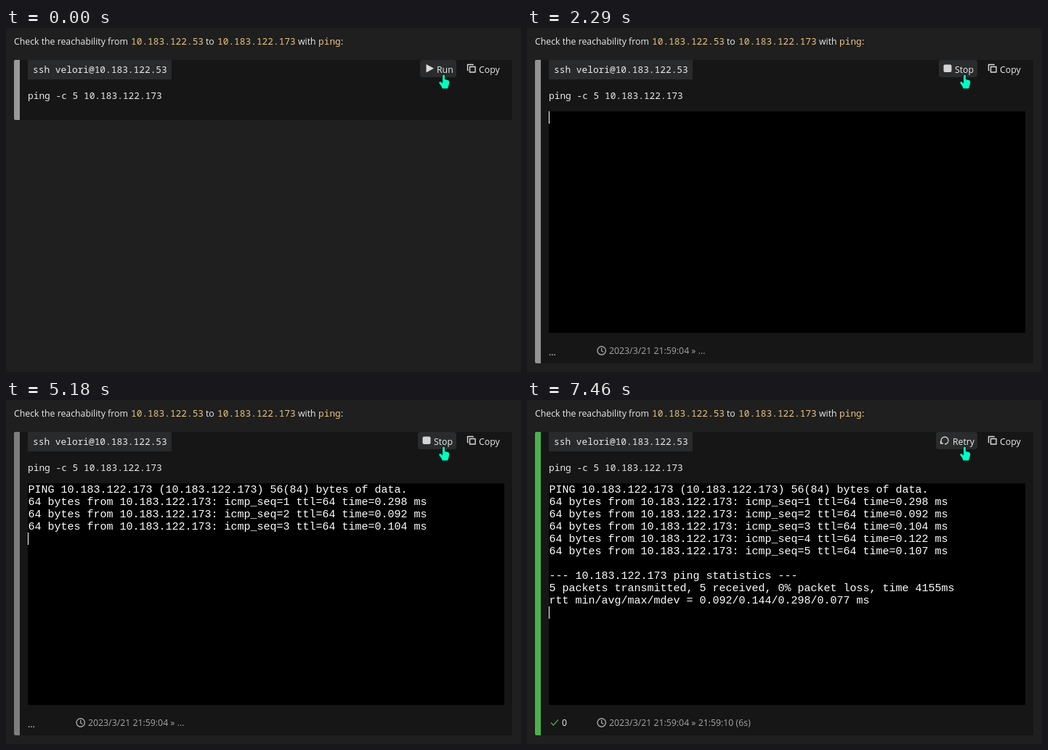
Write an HTML page with a canvas that moves like this. It is 709 by 475 pixels and loops after 8 s.

```html
<!DOCTYPE html>
<html lang="en">
<head>
<meta charset="utf-8">
<title>Ping check</title>
<style>
  html, body { margin: 0; width: 100%; height: 100%; overflow: hidden; background: #1e1f1e; }
  canvas { display: block; width: 709px; height: 475px; }
</style>
</head>
<body>
<canvas id="stage" width="709" height="475"></canvas>
<script>
const ctx = document.getElementById('stage').getContext('2d');

const LOOP = 8000;
const START = 500;
const DONE = 7460;
const PULSE = { period: 1030, peak: 3300, low: 70, high: 147 };

const UI = '12.3px "Open Sans", "Noto Sans", sans-serif';
const CODE = '12.83px "Noto Sans Mono", "DejaVu Sans Mono", monospace';
const TERM = '15px "Liberation Mono", monospace';
const LIGHT = '#ececec', AMBER = '#eac382', GRAY = '#a6a6a6', GREEN = '#4caf50';

const SRC = '10.183.122.53';
const DST = '10.183.122.173';

const reply = (seq, ms) => `64 bytes from ${DST}: icmp_seq=${seq} ttl=64 time=${ms} ms`;

// Terminal output: [time, line]
const output = [
  [2970, `PING ${DST} (${DST}) 56(84) bytes of data.`],
  [3110, reply(1, '0.298')],
  [4140, reply(2, '0.092')],
  [5180, reply(3, '0.104')],
  [6210, reply(4, '0.122')],
  [7240, reply(5, '0.107')],
  [7240, ''],
  [7240, `--- ${DST} ping statistics ---`],
  [7240, '5 packets transmitted, 5 received, 0% packet loss, time 4155ms'],
  [7240, 'rtt min/avg/max/mdev = 0.092/0.144/0.298/0.077 ms'],
];

function rect(x, y, w, h, color, radius = 0) {
  ctx.fillStyle = color;
  ctx.beginPath();
  ctx.roundRect(x, y, w, h, radius);
  ctx.fill();
}

function text(str, x, y, font, color) {
  ctx.font = font;
  ctx.fillStyle = color;
  ctx.fillText(str, x, y);
}

function stroke(path, color, width) {
  ctx.strokeStyle = color;
  ctx.lineWidth = width;
  ctx.lineJoin = 'round';
  ctx.stroke(new Path2D(path));
}

function fill(path, color) {
  ctx.fillStyle = color;
  ctx.fill(new Path2D(path));
}

function barColor(t) {
  if (t < START) return '#9a9a9a';
  if (t >= DONE) return GREEN;
  const { period, peak, low, high } = PULSE;
  const wave = (1 + Math.cos((t - peak) / period * 2 * Math.PI)) / 2;
  const v = Math.round(low + (high - low) * wave);
  return `rgb(${v},${v},${v})`;
}

function drawIntro() {
  text('Check the reachability from', 11, 23, UI, LIGHT);
  text(SRC, 172, 23, CODE, AMBER);
  text('to', 275, 23, UI, LIGHT);
  text(DST, 291, 23, CODE, AMBER);
  text('with', 402, 23, UI, LIGHT);
  text('ping', 430, 23, CODE, AMBER);
  text(':', 461, 23, UI, LIGHT);
}

function drawCard(t) {
  const height = t < START ? 83 : 419;
  rect(11, 44, 686, height, '#161616', 2);
  rect(11, 44, 8, height, barColor(t), [2, 0, 0, 2]);
  rect(30, 44, 198, 27, '#282a2b');
  text('ssh velori@' + SRC, 37, 62, CODE, LIGHT);
  text('ping -c 5 ' + DST, 30, 98, CODE, LIGHT);
}

function button(x, label, labelX) {
  rect(x, 44, 620 - x, 24, '#292b2c', 4);
  text(label, labelX, 62, UI, LIGHT);
}

function drawButtons(t) {
  if (t < START) {
    button(570, 'Run', 593);
    fill('M578.5 50 L589 55.7 L578.5 61.5 Z', '#dcdcdc');
  } else if (t < DONE) {
    button(567, 'Stop', 589);
    rect(573.5, 50.5, 11, 10.5, '#d4d4d4', 2);
  } else {
    button(563, 'Retry', 586);
    stroke('M570.8 58.6 A5 5 0 1 1 575 61', '#dcd6ca', 1.3);
    stroke('M569.5 56.8 V60 H573', '#dcd6ca', 1.3);
  }
  stroke('M638.5 53.5 H646 V61 H638.5 Z', '#dcdcdc', 1.4);
  stroke('M636.5 58.5 H635.5 V50.5 H643 V51.6', '#dcdcdc', 1.4);
  text('Copy', 651, 62, UI, LIGHT);
}

function drawTerminal(t) {
  rect(30, 115, 656, 306, '#000');
  const lines = output.filter(([at]) => t >= at);
  lines.forEach(([, line], i) => text(line, 30.5, 128 + i * 17, TERM, '#fff'));
  rect(30, 115 + lines.length * 17, 1, 17, '#fff');
}

function drawFooter(t) {
  const done = t >= DONE;
  if (done) {
    stroke('M33 445.5 L36.3 449 L43 441.5', GREEN, 1.2);
    text('0', 48, 450, UI, LIGHT);
  } else {
    text('...', 30, 452, UI, LIGHT);
  }
  stroke('M97 445.5 a5.7 5.7 0 1 0 11.4 0 a5.7 5.7 0 1 0 -11.4 0', GRAY, 1.4);
  stroke('M102.7 441.8 V446 L105.4 447.5', GRAY, 1.3);
  text('2023/3/21 21:59:04 » ' + (done ? '21:59:10 (6s)' : '...'), 113, 450, UI, GRAY);
}

function drawPointer() {
  const hand = 'M601 65.5 Q602.5 63.5 604 65.5 V71 L608.3 72 Q610.5 72.5 610.3 75 ' +
    'L609.5 79 L608 83.5 H600.5 L599.5 80.5 L596.3 76 Q596 74 598 74 L601 76.5 Z';
  stroke(hand, '#101414', 2);
  fill(hand, '#00ffc0');
}

function draw(t) {
  rect(0, 0, 709, 475, '#1e1f1e');
  drawIntro();
  drawCard(t);
  drawButtons(t);
  if (t >= START) {
    drawTerminal(t);
    drawFooter(t);
  }
  drawPointer();
}

const origin = performance.now();
function tick() {
  draw((performance.now() - origin) % LOOP);
  requestAnimationFrame(tick);
}
tick();
</script>
</body>
</html>
```
